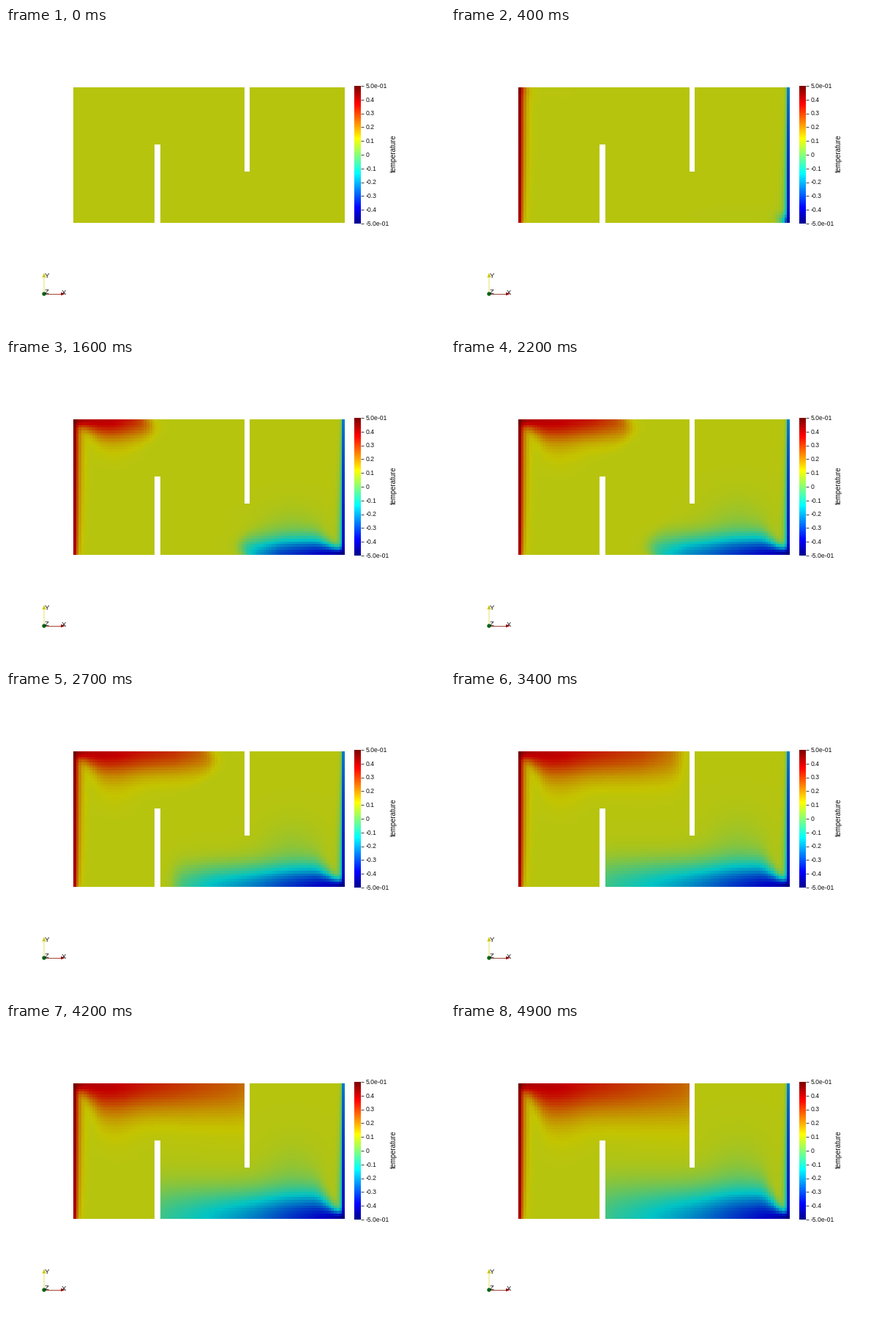
Write a matplotlib script that moves like this. It is 600 px wide and 415 px high and loops after 5000 ms.

```python
import numpy as np
import matplotlib.pyplot as plt
from matplotlib.animation import FuncAnimation
from matplotlib.colors import LinearSegmentedColormap
from matplotlib.patches import Circle, Polygon

W, H, DPI = 600, 415, 100
FRAMES, INTERVAL = 50, 100
LEFT, RIGHT, TOP, BOTTOM = 92, 463, 81.2, 266
COLS, ROWS = 100, 50
PX = 72 / DPI
HOT_STEP, COLD_STEP = .4, .6
HOT_RUN, COLD_RUN = 233, 252

JET = [(0, (0, 0, .5625)), (.111, (0, 0, 1)), (.365, (0, 1, 1)),
       (.492, (.5, 1, .5)), (.619, (1, 1, 0)), (.873, (1, 0, 0)),
       (1, (.5, 0, 0))]


def jet_map(shade):
    stops = [(p, tuple(shade * c for c in rgb)) for p, rgb in JET]
    return LinearSegmentedColormap.from_list("jet_shaded", stops, N=512)


# Cell centres: distance from the hot wall, cold wall, ceiling and floor
width, height = RIGHT - LEFT, BOTTOM - TOP
from_hot, from_top = np.meshgrid((np.arange(COLS) + .5) * width / COLS,
                                 (np.arange(ROWS) + .5) * height / ROWS)
from_cold, from_floor = width - from_hot, height - from_top

baffles = np.zeros((ROWS, COLS), bool)
baffles[21:, 30:32] = True
baffles[:31, 63:65] = True
right_of_low_baffle = np.arange(COLS) >= 32
left_of_high_baffle = np.arange(COLS) < 63


def smooth(x):
    x = np.clip(x, 0, 1)
    return x * x * (3 - 2 * x)


def current(t, along, off, run, front, strength):
    """Gravity current with a rounded nose; it deepens and swells at the baffle."""
    depth = 13 + (10 + 7.5 * t) * smooth(along / 45)
    depth *= 1 + .25 * smooth(t - 2.9) * (along / run) ** 2
    nose = front - 7 * ((off - 15) / 17) ** 2 * (front < run - 18)
    body = 1 / (1 + np.exp(np.clip((along - nose + 8) / 5, -50, 50)))
    fade = .7 + .3 * np.clip((front - along) / 60, 0, 1)
    return strength * body * fade * np.exp(-2.2 * (off / depth) ** 2)


def plume(t, along, off, centre, spread, reach, strength):
    """Faint fluid drifting away behind the current."""
    middle = .45 * reach * (1 - np.exp(-t / 2))
    grown = strength * smooth((t - .2) / 1.2)
    return grown * np.exp(-((along - centre) / spread) ** 2
                          - ((off - middle) / (middle + 1)) ** 2)


def merge(t, step, distance, layer, flow):
    wall = min(1, t / .4) ** .5 * np.exp(-(distance / layer) ** 1.3)
    return step * (1 - (1 - wall) * (1 - np.clip(flow / step, 0, 1)))


def temperature(t):
    front = np.interp(t, [0, .8, 2.7, 3.4, 4], [-30, 54, 199, 229, 280])
    flow = current(t, from_hot, from_top, HOT_RUN, front,
                   .31 - .17 * from_hot / HOT_RUN)
    flow += plume(t, from_hot, from_top, 58, 28, 100, .03)
    layer = 4.5 + 3 * np.sqrt(from_floor / height)
    hot = merge(t, HOT_STEP, from_hot, layer, flow)

    front = np.interp(t, [0, .8, 1.6, 3.4], [-30, 70, 150, 300])
    flow = current(t, from_cold, from_floor, COLD_RUN, front,
                   .58 - .42 * (from_cold / COLD_RUN) ** .7)
    flow += plume(t, from_cold, from_floor, 72, 42, 125, .045)
    layer = 2.7 + 2.8 * from_top / height
    cold = merge(t, COLD_STEP, from_cold, layer, flow)

    field = .1 + hot * left_of_high_baffle - cold * right_of_low_baffle
    return np.ma.array(field, mask=baffles)


fig = plt.figure(figsize=(W / DPI, H / DPI), dpi=DPI, facecolor="white")
ax = fig.add_axes([0, 0, 1, 1])
ax.axis("off")


def label(x, y, text, size, **kw):
    ax.text(x, y, text, fontsize=size * PX, family="Liberation Sans",
            color="#111111", zorder=5, **kw)


def line(xs, ys, color, lw=1):
    ax.plot(xs, ys, color=color, lw=lw * PX, solid_capstyle="butt", zorder=3)


def mesh(left, right, top, bottom, values, cmap, low, high):
    rows, cols = values.shape
    return ax.pcolormesh(np.linspace(left, right, cols + 1),
                         np.linspace(top, bottom, rows + 1), values,
                         cmap=cmap, vmin=low, vmax=high,
                         antialiased=False, edgecolors="none")


field_mesh = mesh(LEFT, RIGHT, TOP, BOTTOM, temperature(0), jet_map(.77), -.5, .5)

# Colour bar
BAR_TOP, BAR_BOTTOM = 79, 267
mesh(476, 485, BAR_TOP, BAR_BOTTOM, np.linspace(1, 0, 188)[:, None], jet_map(1), 0, 1)
for k in range(11):
    y = BAR_TOP + k * (BAR_BOTTOM - BAR_TOP) / 10
    value = .5 - k / 10
    text = f"{value:.1e}" if k in (0, 10) else "0" if k == 5 else f"{value:.1f}"
    line([485, 489], [y, y], "#444444")
    label(492, y - .7, text, 8.6, va="center_baseline")
label(530, 171, "temperature", 9.7, rotation=90, ha="center", va="center")

# Orientation axes
line([52, 76], [363, 363], "#a04838")
line([52, 52], [363, 341], "#f4f0b0", 2)
for tip, color in [([(75, 360.8), (75, 365.2), (81, 363)], "#b01010"),
                   ([(49.5, 340.5), (54.5, 340.5), (52, 334.5)], "#c8c400")]:
    ax.add_patch(Polygon(tip, color=color, lw=0, zorder=4))
ax.add_patch(Circle((52, 363), 2.7, color="#0a6414", lw=0, zorder=4))
for x, y, name in [(79, 361, "X"), (56, 338, "Y"), (56, 360, "Z")]:
    label(x, y, name, 9.5, ha="center", va="center")

ax.set_xlim(0, W)
ax.set_ylim(H, 0)


def update(i):
    field_mesh.set_array(temperature(i * INTERVAL / 1000))
    return [field_mesh]


anim = FuncAnimation(fig, update, frames=FRAMES, interval=INTERVAL,
                     repeat=True, repeat_delay=0, blit=False)
plt.show()
```
